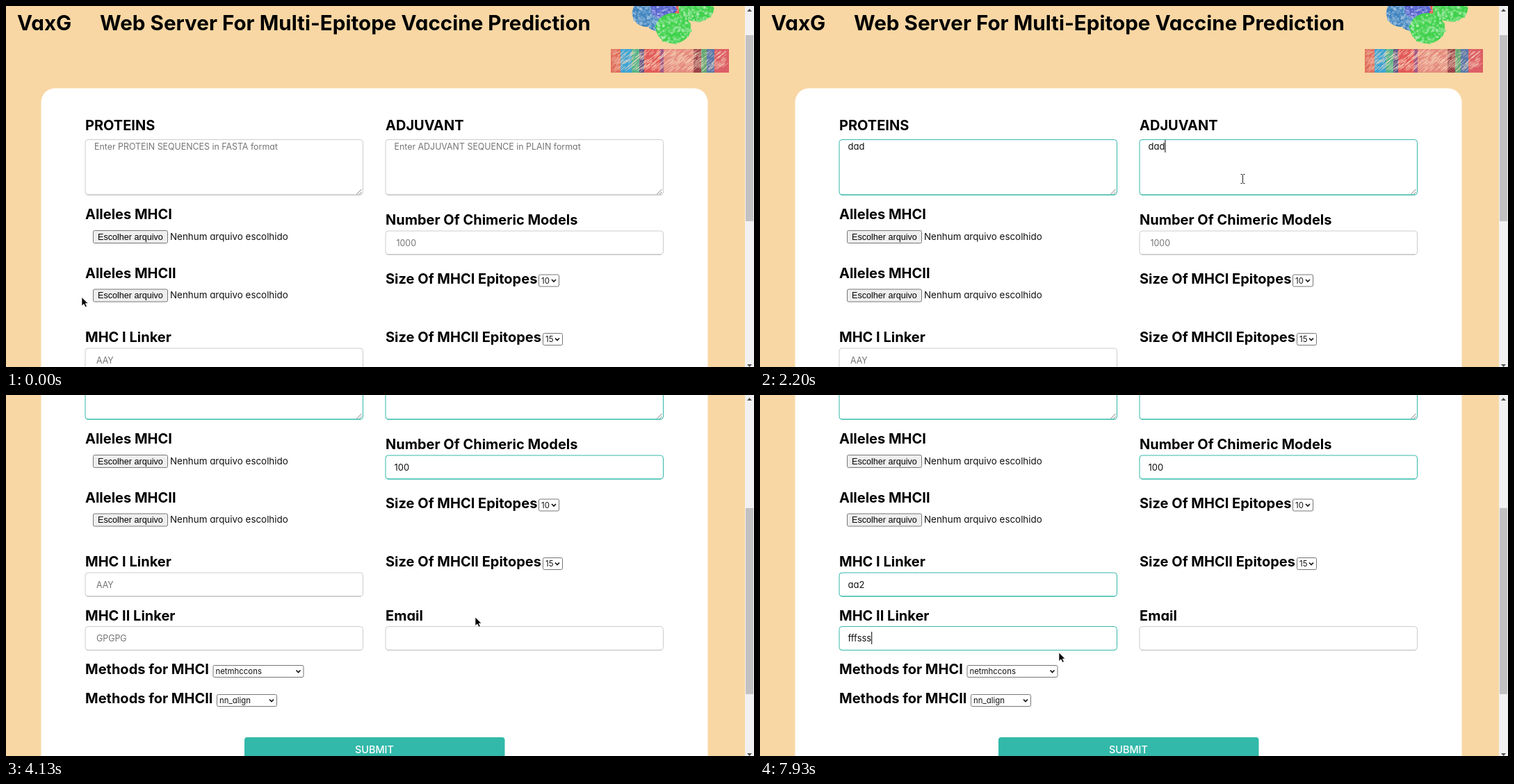
Animation of 1076 by 520 pixels, one loop 8 s. Source, as an HTML page:

```html
<!DOCTYPE html>
<html lang="en">
<head>
<meta charset="utf-8">
<title>Vaccine form</title>
<style>
html, body { margin: 0; width: 100%; height: 100%; overflow: hidden; background: #f8d7a4; }
svg { display: block; width: 1076px; height: 520px; }
text { font-family: Inter, "Open Sans", sans-serif; font-optical-sizing: none; font-feature-settings: "cv11"; white-space: pre; }
.title { font-size: 29.6px; font-weight: 700; }
.label { font-size: 20px; font-weight: 700; }
.hint { font-size: 12.4px; fill: #757575; }
.value { font-size: 13px; fill: #111; }
.note { font-size: 13.4px; fill: #111; }
.option { font-size: 11.4px; fill: #111; }
.button { font: 12.6px "Liberation Sans", Arial, sans-serif; }
.submit { font-size: 14.4px; font-weight: 500; fill: #fff; }
</style>
</head>
<body>
<svg id="stage" viewBox="0 0 1076 520">
  <rect width="1076" height="520" fill="#f8d7a4"/>
  <g id="page"></g>
  <rect x="1063" width="13" height="520" fill="#f1f1f1"/>
  <rect id="thumb" x="1064" y="42" width="11" height="268" fill="#c1c1c1"/>
  <path d="M1066 8l3.5-4 3.5 4zM1066 516l3.5 4 3.5-4z" fill="#505050"/>
  <path id="arrow" d="M0 0V12.5L3 9.8 5.2 14.2 7.3 13.2 5.2 9H9z" fill="#000" stroke="#fff" stroke-width=".7"/>
  <path id="beam" d="M-3 -6.5H-1L0 -5.5 1 -6.5H3M-3 6.5H-1L0 5.5 1 6.5H3M0 -5.5V5.5" fill="none" stroke="#222"/>
</svg>
<script>
const LOOP = 8000, TICK = 200 / 3;
const TEAL = '#33b9a9';
const $ = id => document.getElementById(id);
const page = $('page');

function add(tag, attrs, text) {
  const node = document.createElementNS('http://www.w3.org/2000/svg', tag);
  for (const key in attrs) node.setAttribute(key, attrs[key]);
  if (text) node.textContent = text;
  return page.appendChild(node);
}
const write = (cls, x, y, text, more) => add('text', { class: cls, x, y, ...more }, text);

let seed = 7;
const random = () => (seed = seed * 16807 % 2147483647) / 2147483647;
const spread = () => random() * 2 - 1;

function drawMolecule() {
  // centre, radii, hue, saturation, lightness
  const lobes = [
    [968, 8, 14, 13, 5, 75, 62], [922, 10, 21, 20, 208, 50, 62], [938, 24, 15, 12, 208, 50, 60],
    [946, 4, 18, 14, 233, 55, 66], [993, 5, 25, 17, 125, 62, 66],
    [960, 32, 25, 22, 125, 62, 66]
  ];
  for (const [cx, cy, rx, ry, h, s, l] of lobes) {
    add('ellipse', { cx, cy, rx, ry, fill: `hsl(${h} ${s}% ${l - 12}%)` });
    for (let i = 0; i < 190; i++) {
      const angle = random() * Math.PI * 2, reach = Math.sqrt(random());
      add('circle', {
        cx: cx + rx * reach * Math.cos(angle), cy: cy + ry * reach * Math.sin(angle),
        r: .9 + random() * 1.3, fill: `hsl(${h} ${s}% ${l + spread() * 13}%)`
      });
    }
  }
}

function drawStrip() {
  const bands = [
    [870, '#e0705f'], [884, '#3fa4d4'], [900, '#57b48a'], [911, '#655a88'],
    [918, '#e25a59'], [941, '#a35a88'], [946, '#e58c7e'], [989, '#9c454b'],
    [1000, '#66a876'], [1008, '#5c79aa'], [1019, '#dd5f66'], [1040]
  ];
  bands.slice(0, -1).forEach(([x, fill], i) =>
    add('rect', { x, y: 62, width: bands[i + 1][0] - x, height: 34, fill }));
  for (let i = 0; i < 420; i++) {
    const x = 870 + random() * 162, y = 62 + random() * 27, n = 3 + random() * 4;
    add('path', { d: `M${x} ${y + n}l${n + 1} ${-n}`, stroke: '#fae0c4', 'stroke-width': .9, opacity: .65 });
  }
}

function field(x, y, height, hint, hintX, resizable) {
  const frame = add('rect', { x: x + .5, y: y + .5, width: 399.5, height: height - 1, rx: 4, fill: '#fff' });
  const base = add('path', { d: `M${x + 3} ${y + height - .5}h394` });
  if (resizable) add('path', { d: `M${x + 391} ${y + 79}l7-7M${x + 395} ${y + 79}l3-3`, stroke: '#777' });
  const textY = resizable ? y + 15 : y + 22;
  const hintNode = write('hint', hintX, textY, hint);
  const value = write('value', x + 13, textY, '');
  const caret = add('rect', { y: textY - 14, width: 1, height: 18, fill: '#000' });
  return (text, active, caretOn) => {
    frame.setAttribute('stroke', active ? TEAL : '#ccc');
    base.setAttribute('stroke', active ? TEAL : '#b9b9b9');
    hintNode.style.display = text ? 'none' : '';
    value.textContent = text;
    caret.style.display = caretOn ? '' : 'none';
    caret.setAttribute('x', x + 12.5 + (text ? value.getComputedTextLength() + .5 : 0));
  };
}

function filePicker(y) {
  add('rect', { x: 125.5, y: y + .5, width: 107, height: 18, rx: 2, fill: '#efefef', stroke: '#767676' });
  write('button', 132, y + 13.5, 'Escolher arquivo');
  write('note', 236, y + 13.5, 'Nenhum arquivo escolhido');
}

function select(x, y, width, text) {
  add('rect', { x: x + .5, y: y + .5, width: width - 1, height: 17, rx: 2, fill: '#fff', stroke: '#767676' });
  write('option', x + 4, y + 13, text);
  add('path', { d: `M${x + width - 11} ${y + 7.5}l3 3 3-3`, fill: 'none', stroke: '#111', 'stroke-width': 1.7 });
}

write('title', 16, 35, 'VaxG');
write('title', 135, 35, 'Web Server For Multi-Epitope Vaccine Prediction');
drawMolecule();
drawStrip();
add('rect', { x: 50.5, y: 118.5, width: 959, height: 900, rx: 20, fill: '#fff' });

[
  [114, 179, 'PROTEINS'], [546, 179, 'ADJUVANT'],
  [114, 307, 'Alleles MHCI'], [114, 391.5, 'Alleles MHCII'],
  [546, 315, 'Number Of Chimeric Models'],
  [546, 399.5, 'Size Of MHCI Epitopes'], [546, 484, 'Size Of MHCII Epitopes'],
  [114, 484, 'MHC I Linker'], [114, 561.5, 'MHC II Linker'], [546, 561.5, 'Email'],
  [114, 639, 'Methods for MHCI'], [114, 681, 'Methods for MHCII']
].forEach(([x, y, text]) => write('label', x, y, text));

filePicker(323);
filePicker(407.5);
select(766, 386.5, 30, '10');
select(772, 471, 29, '15');
select(297.5, 626, 131, 'netmhccons');
select(303, 668, 87, 'nn_align');
add('rect', { x: 343, y: 730, width: 374.5, height: 50, rx: 4, fill: TEAL });
write('submit', 530, 753, 'SUBMIT', { 'text-anchor': 'middle' });

// focus: when the field is clicked; keys: when each character appears
const fields = [
  { show: field(113.5, 192, 80.5, 'Enter PROTEIN SEQUENCES in FASTA format', 127, true),
    focus: 600, blur: 1600, text: 'dad', keys: [860, 1060, 1190] },
  { show: field(545.5, 192, 80.5, 'Enter ADJUVANT SEQUENCE in PLAIN format', 558.5, true),
    focus: 1600, blur: 2530, text: 'dad', keys: [1860, 2060, 2190] },
  { show: field(545.5, 323.5, 35, '1000', 561.5),
    focus: 2530, blur: 5000, text: '100', keys: [3060, 3320, 3520], hidden: [4040, 4590] },
  { show: field(113.5, 492.5, 35, 'AAY', 130),
    focus: 5000, blur: 6250, text: 'aa2', keys: [5320, 5520, 5790] },
  { show: field(113.5, 570, 35, 'GPGPG', 130),
    focus: 6250, blur: LOOP, text: 'fffsss', keys: [6660, 6790, 6990, 7320, 7520, 7660] },
  { show: field(545.5, 570, 35, '', 558), focus: Infinity, blur: Infinity, text: '', keys: [] }
];

// time, x, y of the pointer
const pointerPath = [
  [0, 109, 419.5], [200, 70, 372], [400, 150, 268], [600, 380, 232], [800, 497, 227],
  [1200, 497, 227], [1667, 700, 234], [2067, 700, 234], [2600, 667, 332],
  [2800, 667, 332], [2867, 667, 333], [4067, 667, 333], [4133, 675, 320],
  [4400, 741, 306], [4533, 741, 306], [5067, 442, 273], [5267, 442, 273],
  [5533, 425, 273], [5933, 425, 273], [6333, 322, 356], [7667, 322, 356], [7933, 430, 371]
];

function pointerAt(t) {
  const next = pointerPath.findIndex(p => p[0] > t);
  if (next < 0) return pointerPath[pointerPath.length - 1].slice(1);
  const [t0, x0, y0] = pointerPath[next - 1], [t1, x1, y1] = pointerPath[next];
  const u = (t - t0) / (t1 - t0), eased = u * u * (3 - 2 * u);
  return [x0 + (x1 - x0) * eased, y0 + (y1 - y0) * eased];
}

function overField(x, y) {
  const inColumn = (x > 114 && x < 513) || (x > 546 && x < 946);
  const inside = (top, bottom) => y > top && y < bottom;
  return inColumn && (inside(192, 272) || (x > 546 && inside(324, 358)) ||
    (x < 514 && inside(492, 527)) || inside(570, 605));
}

function render(time) {
  const t = Math.floor((time + 5) / TICK) * TICK;
  const scroll = 79 * Math.max(0, Math.min(3, Math.round((t - 4000) / TICK) + 1));
  page.setAttribute('transform', `translate(0 ${-scroll})`);
  $('thumb').setAttribute('y', 42 + scroll * .51);

  for (const f of fields) {
    const typed = f.keys.filter(key => t >= key).length;
    const blink = f.hidden && t >= f.hidden[0] && t < f.hidden[1];
    f.show(f.text.slice(0, typed), t >= f.focus, t >= f.focus && t < f.blur && !blink);
  }

  const [x, y] = pointerAt(t);
  // the pointer keeps its shape until it moves after scrolling
  const beam = t > 3990 && t < 4100 || overField(x, y + scroll);
  $('beam').style.display = beam ? '' : 'none';
  $('arrow').style.display = beam ? 'none' : '';
  const place = beam ? [Math.round(x) - .5, Math.round(y)] : [x, y];
  $(beam ? 'beam' : 'arrow').setAttribute('transform', `translate(${place})`);
}

const start = performance.now();
function loop() {
  render((performance.now() - start) % LOOP);
  requestAnimationFrame(loop);
}
loop();
</script>
</body>
</html>
```
